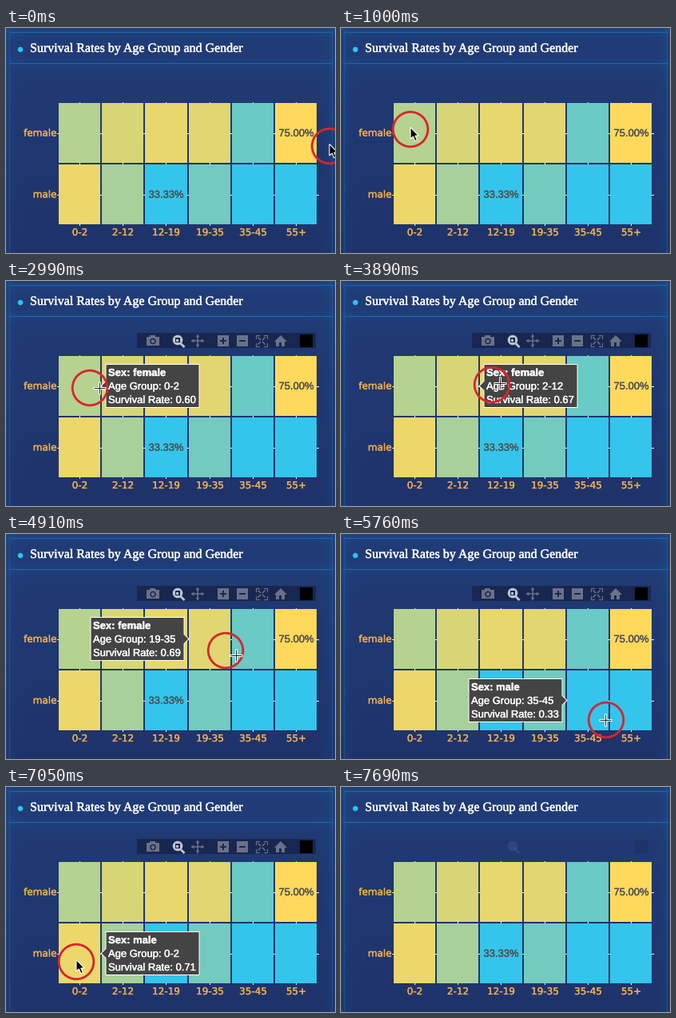
A matplotlib script that plays this animation: 412 px wide and 282 px high, repeating every 9510 ms.

```python
import numpy as np
import matplotlib.pyplot as plt
from matplotlib import patheffects
from matplotlib.animation import FuncAnimation
from matplotlib.patches import Circle, Polygon, Rectangle, RegularPolygon

plt.rcParams["text.hinting"] = "none"
W, H, DPI = 412, 282, 100
LOOP, STEP = 9510, 30
TICK = 128  # the pointer moves in ticks of this many ms
PT = 72 / DPI  # points per pixel

AGES = ["0-2", "2-12", "12-19", "19-35", "35-45", "55+"]
RATES = {"female": [0.60, 0.67, 0.70, 0.69, 0.44, 0.75],
         "male": [0.71, 0.57, 0.33, 0.46, 0.33, 0.33]}
ROW_Y = {"female": 131.5, "male": 208.5}
LOW, HIGH = np.array([52, 197, 236]) / 255, np.array([255, 217, 92]) / 255
ORANGE, ICON, LIT, BAR = "#eeae4c", "#6a7189", "#bcc2d2", "#18274f"

# pointer moves: start ms, ticks, end point, sideways swing (x + yj)
HOME = 405 + 148j
MOVES = [(230, 7, 87 + 127j, -25 + 60j), (1250, 9, 110 + 134j, 34),
         (2470, 10, 150 + 134j, -25), (3890, 2, 228 + 126j, 0),
         (4280, 10, 322 + 166j, 0), (5630, 2, 332 + 233j, 0),
         (6150, 4, 78 + 234j, 0), (6920, 2, 88 + 219j, 0),
         (7300, 4, -30 + 45j, 0)]
BAR_ON, BAR_OFF = 2470, 7690

fig = plt.figure(figsize=(W / DPI, H / DPI), dpi=DPI)
ax = fig.add_axes([0, 0, 1, 1])
ax.set_xlim(0, W)
ax.set_ylim(H, 0)
ax.axis("off")


def label(x, y, s, px, color, font, **kw):
    txt = ax.text(x, y, s, size=px * PT, color=color, family=font, **kw)
    txt.set_path_effects([patheffects.withStroke(linewidth=0.35 * PT, foreground=color)])
    return txt


def line(xs, ys, color, px=1, **kw):
    return ax.plot(xs, ys, color=color, lw=px * PT, **kw)[0]


def cell_left(i):
    return np.floor(66.5 + 54.2 * i)


def cell_mid(i):
    return cell_left(i) + 26.5


def draw_backdrop():
    y, x = np.mgrid[0:H, 0:W] + 0.5
    k = (y / H)[..., None]
    img = (1 - k) * np.array([33, 60, 119]) + k * np.array([31, 51, 107])
    glow = sum(np.exp(-np.abs(d) / 5) for d in (x - 4, x - 408, y - 5, y - 44))
    img = img + 0.35 * glow[..., None] * np.array([-6, 24, 28])
    ax.imshow(np.clip(img / 255, 0, 1), extent=(0, W, H, 0), aspect="auto",
              interpolation="nearest", zorder=0)
    for yy in (4.5, 43.5):
        line([4, 408], [yy, yy], "#1b70aa", alpha=0.85, zorder=1)
    for xx in (4.5, 408.5):
        line([xx, xx], [5, H], "#1c5f99", alpha=0.6, zorder=1)
    ax.add_patch(Circle((18, 27), 3.3, color="#2cc3ea", lw=0))
    label(30, 30, "Survival Rates by Age Group and Gender", 16, "white",
          "Liberation Serif")


def draw_heatmap():
    for i, age in enumerate(AGES):
        x = cell_mid(i)
        line([x, x], [93, 247], "white", zorder=1)
        label(x, 260, age, 12, ORANGE, "DejaVu Sans", ha="center")
    for (sex, y), top in zip(ROW_Y.items(), (94, 171)):
        line([64, 391], [y, y], "white", zorder=1)
        label(63.5, y + 4, sex, 12, ORANGE, "DejaVu Sans", ha="right")
        for i, rate in enumerate(RATES[sex]):
            x, t = cell_left(i), (rate - 0.33) / 0.42
            ax.add_patch(Rectangle((x, top), cell_left(i + 1) - 2 - x, 75, lw=0,
                                   color=LOW + t * (HIGH - LOW), zorder=2))
    for i, sex in ((5, "female"), (2, "male")):
        s = "75.00%" if i == 5 else "33.33%"
        label(cell_mid(i), ROW_Y[sex] + 4.3, s, 13, "#505050", "Liberation Sans",
              ha="center", zorder=3)


def build_toolbar():
    """Return (artists that vanish, artists that leave a faint trace)."""
    parts, kept = [], []

    def patch(p, color=ICON, store=parts):
        p.set(color=color, lw=0, zorder=4)
        store.append(ax.add_patch(p))

    def box(x, y, w, h, color=ICON, store=parts):
        patch(Rectangle((x - w / 2, y - h / 2), w, h), color, store)

    def stroke(xs, ys, px=1.5, color=ICON, store=parts):
        store.append(line(xs, ys, color, px, zorder=4))

    y = 75
    box(276, 74.5, 224, 19, BAR)
    # camera
    box(184, 75.5, 16, 11)
    box(184, 70, 7, 4)
    for r, c in ((3.8, BAR), (2.3, ICON)):
        patch(Circle((184, 75.5), r), c)
    # zoom
    stroke([218, 222.5], [77.5, 82], 2.8, LIT, kept)
    patch(Circle((215, 74), 6.3), LIT, kept)
    box(215, 74, 6, 6, BAR)
    box(215, 74, 3, 3, LIT)
    # pan
    stroke([234, 246], [y, y])
    stroke([240, 240], [69, 81])
    for a in np.arange(4) * np.pi / 2:
        patch(RegularPolygon((240 + 6 * np.sin(a), y - 6 * np.cos(a)), 3, radius=2.7,
                             orientation=a + np.pi))
    # zoom in and out
    for x in (272, 296):
        box(x, y, 14, 14)
        box(x, y, 8, 2, BAR)
    box(272, y, 2, 8, BAR)
    # autoscale
    for dx in (-1, 1):
        for dy in (-1, 1):
            cx, cy = 320 + 7 * dx, y + 7 * dy
            stroke([cx - 4 * dx, cx, cx], [cy, cy, cy - 4 * dy], 1.2)
            stroke([320 + 1.5 * dx, cx - 3 * dx], [y + 1.5 * dy, cy - 3 * dy])
    # home
    patch(Polygon([(336, 76), (344, 68), (352, 76)]))
    box(344, 78, 11, 8)
    box(344, 79.5, 3, 5, BAR)
    box(376, y, 16, 16, "black", kept)
    return parts, kept


draw_backdrop()
draw_heatmap()
fading, lasting = build_toolbar()

bubble = ax.add_patch(Polygon([(0, 0), (1, 1), (1, 0)], fc="#444444", ec="white",
                              lw=PT, joinstyle="miter", zorder=6))
lines = [label(0, 0, "", 13, "white", "Liberation Sans", zorder=7,
               weight="bold" if i == 0 else "normal") for i in range(3)]

ring = ax.add_patch(Circle((0, 0), 21.8, fill=False, ec="#d9242c", lw=2.8 * PT, zorder=8))
ARROW = np.array([(0, 0), (0, 14.5), (3.3, 11.4), (5.8, 17.2), (8.3, 16.1),
                  (5.8, 10.5), (10.2, 10.5)])
arrow = ax.add_patch(Polygon(ARROW, fc="black", ec="white", lw=1.1 * PT, zorder=9))
cross = [(line([], [], c, px, zorder=z, solid_capstyle="butt"),
          line([], [], c, px, zorder=z, solid_capstyle="butt"), r)
         for c, px, z, r in (("white", 3, 9, 8), ("#222222", 1, 10, 7))]


def glide(t):
    """Ring position and the end point of the current move, as complex numbers."""
    pos = end = HOME
    for start, ticks, goal, swing in MOVES:
        if t < start:
            break
        p = min(((t - start) // TICK + 1) / ticks, 1)
        ease = p * p * (3 - 2 * p)
        pos, end = end + (goal - end) * ease + swing * np.sin(np.pi * p), goal
    return pos, end


def place_hover(t):
    # the label trails the pointer by one tick
    pos, _ = glide(t - TICK)
    shown = BAR_ON + 2 * TICK < t < BAR_OFF - 2 * TICK
    bubble.set_visible(shown)
    for txt in lines:
        txt.set_visible(shown)
    i = int(np.clip((pos.real - 66) // 54.2, 0, 5))
    sex = "female" if pos.imag < 170 else "male"
    side = 1 if i < 3 else -1
    tip, cy = cell_mid(i) + 26.5 * side, ROW_Y[sex]
    near, far = tip + 6 * side, tip + 123 * side
    bubble.set_xy([(tip, cy), (near, cy - 6), (near, cy - 27), (far, cy - 27),
                   (far, cy + 27), (near, cy + 27), (near, cy + 6)])
    rows = (f"Sex: {sex}", f"Age Group: {AGES[i]}", f"Survival Rate: {RATES[sex][i]:.2f}")
    for n, (txt, s) in enumerate(zip(lines, rows)):
        txt.set_text(s)
        txt.set_position((min(near, far) + 3, cy - 12.5 + 17 * n))


def place_pointer(t):
    pos, end = glide(t)
    tip = pos + 0.3 * (end - pos)  # the ring lags behind the pointer
    crossed = BAR_ON + TICK < t < 6530
    ring.set_visible(t < BAR_OFF)
    ring.center = pos.real, pos.imag
    arrow.set_visible(t < BAR_OFF and not crossed)
    arrow.set_xy(ARROW + (tip.real, tip.imag - 2.5))
    x, y = np.floor(tip.real) - 0.5, np.floor(tip.imag) - 0.5
    for h, v, r in cross:
        h.set_data([x - r, x + r], [y, y])
        v.set_data([x, x], [y - r, y + r])
        h.set_visible(crossed)
        v.set_visible(crossed)


def update(n):
    t = n * STEP + 20
    place_hover(t)
    place_pointer(t)
    alpha = np.clip(min((t - BAR_ON) / 260, (BAR_OFF - t) / 390), 0, 1)
    trace = max(alpha, 0.1) if t > BAR_OFF else alpha
    for group, a in ((fading, alpha), (lasting, trace)):
        for art in group:
            art.set_alpha(a)
            art.set_visible(a > 0)
    return []


anim = FuncAnimation(fig, update, frames=LOOP // STEP, interval=STEP,
                     repeat=True, repeat_delay=0, blit=False)
plt.show()
```
